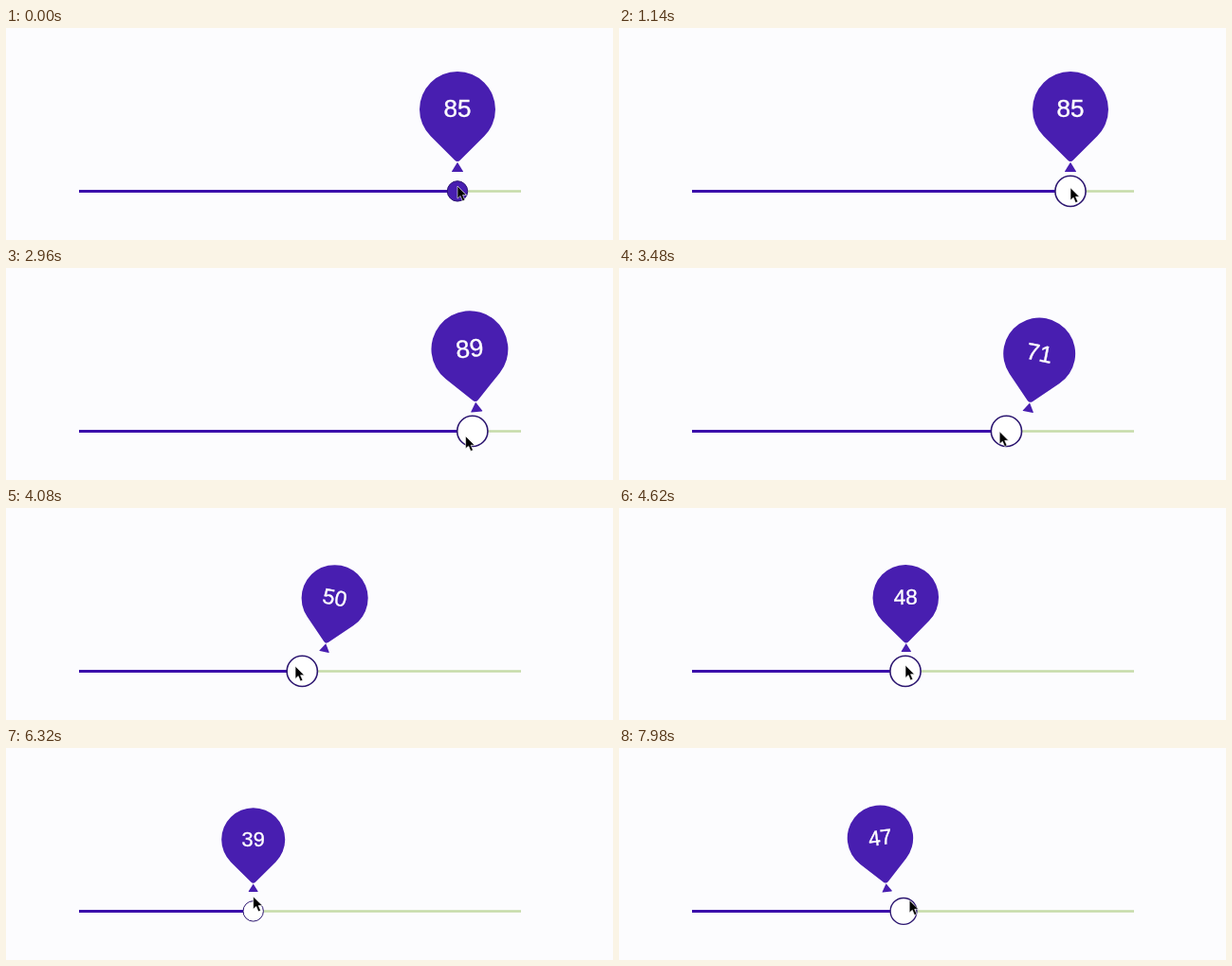
An HTML page for the animation above (8 s loop, 640x224 px).

```html
<!DOCTYPE html>
<html lang="en">
<head>
<meta charset="utf-8">
<title>Balloon slider</title>
<style>
  html, body { margin: 0; width: 100%; height: 100%; overflow: hidden; background: #fcfcfe; }
  svg { display: block; width: 100vw; height: 100vh; }
  text { font: 18.2px "Liberation Sans", Arial, sans-serif; text-anchor: middle;
         fill: #fff; stroke: #fff; stroke-width: .3; }
</style>
</head>
<body>
<svg viewBox="0 0 640 224">
  <path d="M77 172.5H543" stroke="#c6dba8" stroke-width="2.5"/>
  <path id="filled" stroke="#3b0fab" stroke-width="3"/>
  <g id="balloon" fill="#481eb0">
    <path d="M-19.8-26.4A28 28 0 1 1 19.8-26.4L2.1-8.7Q0-6.6-2.1-8.7Z"/>
    <path d="M0-7.2L4.2-.4Q4.2 0 3.8 0H-3.8Q-4.2 0-4.2-.4Z"/>
    <text id="label" y="-40.4"></text>
  </g>
  <circle id="thumb" cy="172.4" stroke="#2c1670"/>
  <path id="cursor" d="M0 0V13.2L3.1 10.4L5.4 15.8L7.8 14.8L5.5 9.5H9.5Z"
        fill="#000" stroke="#fff" stroke-width=".6" stroke-linejoin="round"/>
</svg>
<script>
const LOOP = 8000, STEP = 5, LEFT = 77, LENGTH = 466;
const THUMB_DELAY = 45, FOLLOW = 144;                    // ms
const LEAN = .48, STIFFNESS = .011, DAMPING = .4;        // degrees per px, rad per ms, ratio
const PRESS_RAMP = 150;

// The pointer's stops: time, x, y.
const stops = [
  [0, 476, 167], [2555, 476, 171], [2815, 508, 179], [4100, 302, 167],
  [4745, 302, 166], [4935, 260.7, 157], [7650, 260.7, 157], [8000, 308.8, 161]
];
const presses = [[900, 1400], [2500, 5820], [7560, 7920]];

const part = id => document.getElementById(id);
const [filled, balloon, label, thumb, cursor] =
  ["filled", "balloon", "label", "thumb", "cursor"].map(part);

const ramp = (time, start) => Math.min(1, Math.max(0, (time - start) / PRESS_RAMP));
const pressed = time =>
  presses.reduce((sum, [down, up]) => sum + ramp(time, down) - ramp(time, up), 0);

function pointer(time) {
  const t = Math.max(0, time);
  const next = Math.max(1, stops.findIndex(stop => stop[0] > t));
  const [t0, x0, y0] = stops[next - 1], [t1, x1, y1] = stops[next];
  const u = (t - t0) / (t1 - t0);
  return { x: x0 + (x1 - x0) * u, y: y0 + (y1 - y0) * u };
}

const thumbX = time => pointer(time - THUMB_DELAY).x;

// The balloon trails the thumb and swings like a damped spring.
function swing() {
  const states = [];
  let x = thumbX(0), lean = 0, speed = 0;
  for (let time = 0; time <= LOOP; time += STEP) {
    states.push({ x, lean });
    const lag = x - thumbX(time);
    x -= lag * STEP / FOLLOW;
    speed += STEP * STIFFNESS * (STIFFNESS * (LEAN * lag - lean) - 2 * DAMPING * speed);
    lean += speed * STEP;
  }
  return states;
}
const states = swing();

function draw(time) {
  const x = thumbX(time), value = (x - LEFT) / LENGTH * 100;
  const press = pressed(time), white = ramp(time, presses[0][0]) * 100;
  const state = states[Math.floor(time / STEP)], tip = pointer(time);
  filled.setAttribute("d", `M${LEFT} 172.5H${x}`);
  label.textContent = Math.floor(value);
  balloon.setAttribute("transform",
    `translate(${state.x} 152) rotate(${state.lean}) scale(${1 + value / 200})`);
  thumb.setAttribute("cx", x);
  thumb.setAttribute("r", 10.7 + 5.4 * press);
  thumb.setAttribute("stroke-width", 1 + .6 * press);
  thumb.style.fill = `color-mix(in srgb, #fff ${white}%, #481eb0)`;
  cursor.setAttribute("transform", `translate(${tip.x} ${tip.y})`);
}

const start = performance.now();
function tick() {
  draw((performance.now() - start) % LOOP);
  requestAnimationFrame(tick);
}
tick();
</script>
</body>
</html>
```
